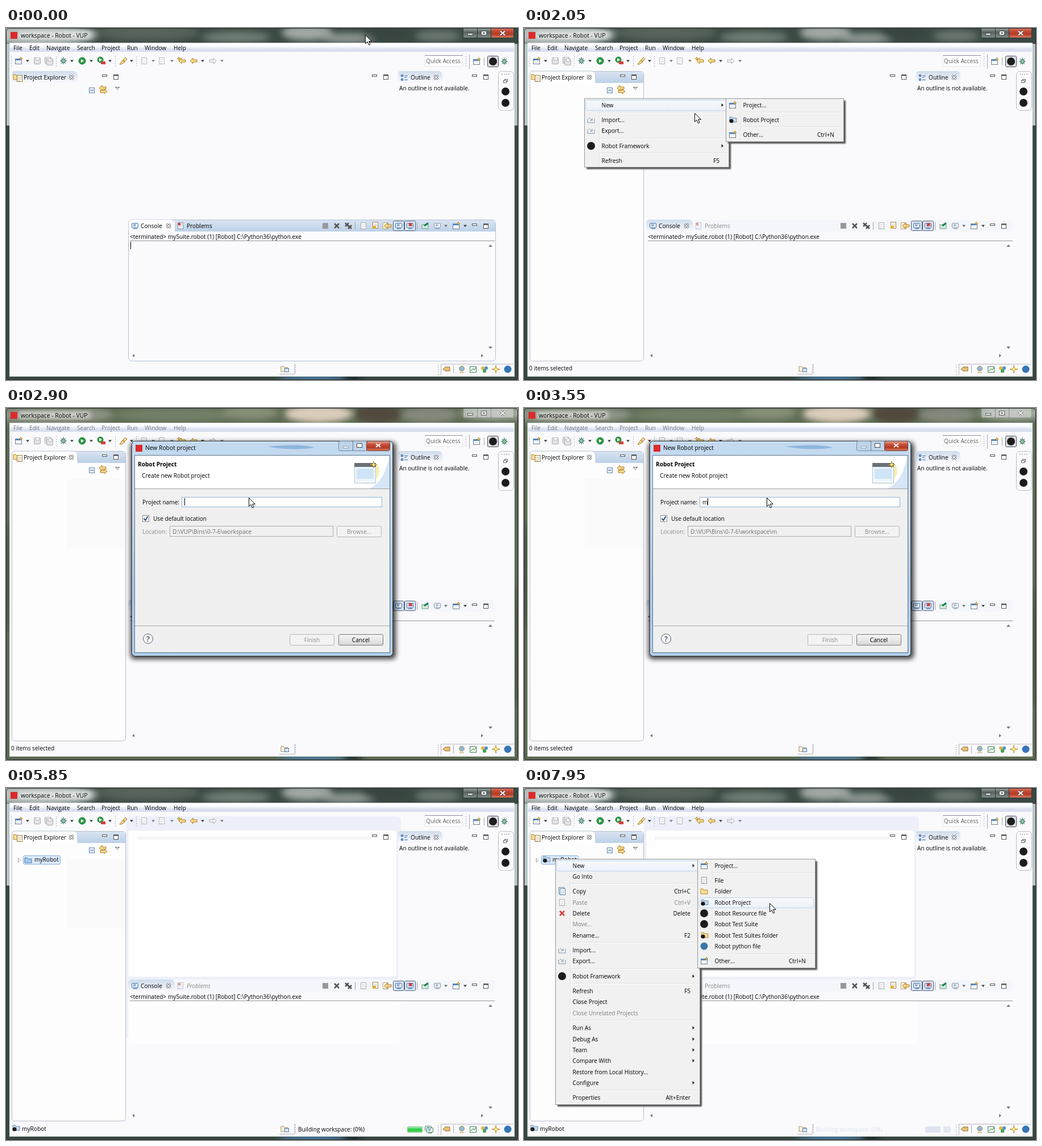
Write an HTML page that moves like this. It is 901 px wide and 621 px high and loops after 8 s.

```html
<!DOCTYPE html>
<html lang="en">
<head>
<meta charset="utf-8">
<title>Robot workspace</title>
<style>
html, body { margin: 0; width: 100%; height: 100%; overflow: hidden; }
svg { display: block; width: 100vw; height: 100vh; }
text { font: 10.15px "Open Sans", "Noto Sans", sans-serif; white-space: pre; }
.caption { font-size: 10.3px; }
.bold { font-weight: 700; }
.busy { font-style: italic; }
.help { font-size: 13px; font-weight: 600; }
</style>
</head>
<body>
<svg id="stage" viewBox="0 0 901 621" xmlns="http://www.w3.org/2000/svg"></svg>
<script>
const LOOP = 8000;
const stage = document.getElementById('stage');

// Drawing helpers: each returns SVG markup.
const rect = (x, y, w, h, fill, more = '') =>
  `<rect x="${x}" y="${y}" width="${w}" height="${h}" fill="${fill}" ${more}/>`;
const box = (x, y, w, h, fill, stroke, r = 0) =>
  rect(x + .5, y + .5, w - 1, h - 1, fill, `stroke="${stroke}" rx="${r}"`);
const path = (d, stroke, fill = 'none', more = '') =>
  `<path d="${d}" stroke="${stroke}" fill="${fill}" ${more}/>`;
const dot = (x, y, r, fill, stroke = 'none') =>
  `<circle cx="${x}" cy="${y}" r="${r}" fill="${fill}" stroke="${stroke}"/>`;
const blob = (x, y, rx, ry, fill) =>
  `<ellipse cx="${x}" cy="${y}" rx="${rx}" ry="${ry}" fill="${fill}"/>`;
const text = (x, y, s, fill = '#000', more = '') =>
  `<text x="${x}" y="${y}" fill="${fill}" ${more}>${s}</text>`;
const group = (more, ...parts) => `<g ${more}>${parts.join('')}</g>`;
const during = (from, to, ...parts) => group(`data-from="${from}" data-to="${to}"`, ...parts);
const ramp = (id, ...colors) => `<linearGradient id="${id}" x2="0" y2="1">` +
  colors.map((c, i) => `<stop offset="${i / (colors.length - 1)}" stop-color="${c}"/>`).join('') +
  '</linearGradient>';
const blur = (id, size) => `<filter id="${id}"><feGaussianBlur stdDeviation="${size}"/></filter>`;

// Small symbols, placed by their centre.
const down = (x, y, c = '#333') => path(`M${x - 3} ${y - 1.5}h6l-3 3.5z`, 'none', c);
const right = (x, y, c = '#222') => path(`M${x - 1.5} ${y - 3}l3.5 3l-3.5 3z`, 'none', c);
const grip = (x, y, n = 9) => path(`M${x + .5} ${y}v${n * 2}`, '#9a9aa4', 'none', 'stroke-dasharray="1.5 2.5"');
const bar = (x, y, h = 14) => rect(x, y, 1, h, '#a5a5ad');
const cross = (x, y) => {
  const d = `M${x - 3.5} ${y - 3.5}l7 7m0 -7l-7 7`;
  return path(d, '#666', 'none', 'stroke-width="3.4"') + path(d, '#fff', 'none', 'stroke-width="1.5"');
};
const minMax = (x, y) => box(x - 4, y - 2, 9, 4, '#fff', '#555') +
  box(x + 16, y - 2, 9, 9, '#fff', '#555') + rect(x + 16, y - 1, 9, 1.5, '#555');
const star = (x, y, r = 4) => path(
  `M${x} ${y - r}Q${x} ${y} ${x + r} ${y}Q${x} ${y} ${x} ${y + r}Q${x} ${y} ${x - r} ${y}Q${x} ${y} ${x} ${y - r}z`,
  '#b8922c', '#ffe88c');
const pane = (x, y) => box(x - 6, y - 4, 12, 10, '#eef6ff', '#7b7f84') +
  rect(x - 6, y - 4, 12, 3, '#4f86c4') + star(x + 4, y - 4, 3);
const sheet = (x, y, c = '#8795a8') => box(x - 5, y - 6, 10, 12, '#fff', c) +
  path(`M${x - 3} ${y - 2}h6m-6 3h6m-6 3h4`, c, 'none', 'opacity=".6"');
const folder = (x, y, fill = '#f8dc94', line = '#b88a35') =>
  path(`M${x - 6} ${y + 5}v-9h4l1.5 2h6.5v7z`, line, fill);
const disc = (x, y) => box(x - 6, y - 6, 12, 12, '#e3e3e6', '#a9a9af', 1) + box(x - 3, y - 6, 7, 5, '#fff', '#bbb');
const arrow = (x, y, fill = '#f9dc8c', line = '#a87a20') =>
  path(`M${x - 6} ${y}l5 -5v3h7v4h-7v3z`, line, fill);
const bug = (x, y) => path(`M${x - 6} ${y}h12m-10 -5l8 10m0 -10l-8 10m4 -12v13`, '#3d6f70') +
  dot(x, y, 3.5, '#8fc09b', '#2f6b62');
const run = (x, y, r = 6) => dot(x, y, r, '#2d9b45', '#1b7430') +
  path(`M${x - 2} ${y - 3}l5 3l-5 3z`, 'none', '#fff');
const logo = (x, y, r = 7) => dot(x, y, r, '#1c1c1c');
const project = (x, y) => folder(x + 1, y - 1, '#c9def3', '#5f87b4') + logo(x - 2, y + 2, 3.6);
const screen = (x, y, c = '#3c6da8') => box(x - 6, y - 5, 12, 9, '#e8f1fb', c, 1) +
  path(`M${x - 3} ${y - 2}h5m-5 2h4m-4 5h7`, c);
const strike = (x, y, c = '#555', r = 4) =>
  path(`M${x - r} ${y - r}l${2 * r} ${2 * r}m0 ${-2 * r}l${-2 * r} ${2 * r}`, c, 'none', 'stroke-width="2.5"');
const transfer = (x, y) => path(`M${x - 6} ${y - 2}v7h12v-7M${x - 4} ${y - 4}l6 5m0 -4v4h-4`, '#7796b5');
const appMark = (x, y) => rect(x, y, 12, 12, '#dc2a2a');

const defs = '<defs>' +
  ramp('menubar', '#fff', '#fbfcff', '#dbe3f1', '#d6deee') + ramp('header', '#d9e4f2', '#bcd0e7') +
  ramp('tab', '#cfdcec', '#f9f9fd') + ramp('button', '#f4f4f4', '#e8e8e8', '#d6d6d6') +
  ramp('closeRamp', '#e7aa9c', '#c9503b', '#b23a25', '#d98266') + ramp('glass', '#c3daf0', '#c3d6ea', '#9fc3e6', '#a9cbec') +
  ramp('hot', '#f7f9fc', '#ecf2fa') + ramp('control', '#b8bfbf', '#59635f', '#828c89') +
  ramp('trough', '#f7f7f7', '#c9c9c9', '#dedede') + ramp('done', '#b5f3b9', '#25c93e', '#5fdd70') +
  blur('haze', 6) + blur('soft', 4) + blur('edge', 1.2) + '</defs>';

// Window frame
const controls = (fill, close, ink, line, opacity) =>
  group(`opacity="${opacity}"`, box(804, -3, 26, 21, fill, line, 3), box(829, -3, 25, 21, fill, line), box(853, -3, 41, 21, close, line, 3)) +
  box(812, 9, 10, 4, '#fff', ink) + box(836, 5, 10, 8, '#fff', ink) + rect(839, 8, 4, 2, ink) +
  path('M870 5.5l8 7m0 -7l-8 7', ink, 'none', 'stroke-width="3.5"') + path('M870 5.5l8 7m0 -7l-8 7', '#fff', 'none', 'stroke-width="2"');

const lowerEdge = blob(540, 620, 60, 7, '#4b7ba6') + blob(610, 620, 18, 6, '#16232b');
const activeFrame = rect(0, 0, 901, 621, '#3a4a43') +
  group('filter="url(#haze)"', blob(60, 12, 100, 20, '#b7c0bd'), blob(250, 8, 90, 14, '#56645c'),
    blob(405, 16, 60, 10, '#707f75'), blob(530, 8, 45, 14, '#a1a8a4'), blob(600, 18, 50, 9, '#8e9793'),
    blob(665, 8, 40, 13, '#39443f'), blob(760, 14, 40, 10, '#697770'), lowerEdge) +
  rect(0, 28, 7, 144, '#bac5c5') + rect(894, 28, 7, 144, '#bac5c5') +
  controls('url(#control)', 'url(#closeRamp)', '#454b50', '#303836', 1);
const idleFrame = rect(0, 0, 901, 621, '#5d6a52') +
  group('filter="url(#haze)"', blob(80, 12, 110, 16, '#8d9486'), blob(300, 12, 110, 13, '#737f69'),
    blob(430, 8, 50, 13, '#858e78'), blob(550, 10, 60, 16, '#dccdbc'), blob(655, 10, 42, 18, '#51483d'),
    blob(745, 12, 50, 14, '#84897f'), blob(860, 9, 60, 12, '#a9b0a5'), blob(2, 300, 6, 100, '#465340'),
    blob(899, 420, 6, 110, '#465340'), lowerEdge) +
  controls('#e5e9e5', '#e5e9e5', '#555', '#747b75', .45);

const frameFront = rect(7, 27, 887, 587, '#fafafd') + rect(7, 27, 887, 15, 'url(#menubar)') +
  rect(6.5, 26.5, 888, 588, 'none', 'stroke="#e5ecec"') + rect(.5, .5, 900, 620, 'none', 'stroke="#202927" rx="5"') +
  group('filter="url(#soft)" opacity=".6"', rect(22, 6, 126, 13, '#fff')) +
  appMark(8, 7) + text(26, 17, 'workspace - Robot - VUP', '#000', 'class="caption"');

const menuNames = { File: 13, Edit: 41, Navigate: 71, Search: 125, Project: 168, Run: 213, Window: 244, Help: 295 };
const menuBar = ink => Object.entries(menuNames).map(([s, x]) => text(x, 39, s, ink)).join('');

const toolbar = [9, 88, 192, 229, 809].map(x => grip(x, 50)).join('') +
  [38, 116, 150, 183, 221, 346].map(x => down(x, 58)).join('') +
  [259, 292, 380].map(x => down(x, 58, '#777')).join('') +
  pane(22, 58) + disc(55, 58) + disc(74, 57) + disc(77, 60) + bug(101, 58) + run(134, 58) +
  run(166, 56, 5) + rect(167, 59, 8, 5, '#d2413a') +
  path('M200 64l5 -7l4 3l-6 4zM206 56l4 -4l3 3l-4 4z', '#a97b2e', '#f6d58a') +
  sheet(243, 58, '#b5b5ba') + sheet(274, 58, '#b5b5ba') + arrow(310, 58) + star(304, 54, 3) + arrow(330, 58) +
  path('M370 58l-5 -5v3h-7v4h7v3z', '#aaa', '#f4f4f6') +
  box(737, 48, 67, 20, '#fff', '#e6e6ec') + rect(737, 48, 67, 1, '#8d8d96') + text(739, 62, 'Quick Access', '#5c5c5c') +
  bar(815, 47, 25) + pane(828, 59) + bar(841, 52) + box(847, 49, 20, 20, '#dcdfe6', '#4b4b50', 2) + logo(857, 59) + bug(877, 59);

// Views
const explorerIdle = path('M10 96V81q0 -5 5 -5h104q6 0 7 8v12z', 'none', 'url(#tab)');
const explorerActive = box(10, 76, 201, 512, '#fdfdfe', '#b9bdca', 5) + rect(125, 77, 85, 20, 'url(#header)') +
  path('M10.5 97V81q0 -5 5 -5h103q7 0 7.5 8v13', '#b5c1d2', '#fff');
const explorer = folder(19, 86) + sheet(24, 89, '#9c7936') + text(31, 91, 'Project Explorer') + cross(115, 87) + minMax(173, 84) +
  box(146, 105, 10, 10, '#e9f1fb', '#6386af') + rect(148, 109.5, 6, 1, '#345b8c') +
  arrow(170, 106) + path('M178 112l-5 -4v2h-7v4h7v2z', '#a87a20', '#f9dc8c') +
  path('M192.5 104.5h7l-3.5 4z', '#666', '#fff');

const outline = path('M690 96V81q0 -5 5 -5h66q6 0 7 8v12z', 'none', 'url(#tab)') +
  box(695, 82, 4, 4, '#8bb4e0', '#3c6ca8') + box(695, 89, 4, 4, '#8bb4e0', '#3c6ca8') + path('M701 84.5h6m-6 3h4m-4 4h6', '#3c6ca8') +
  text(712, 91, 'Outline') + cross(757, 87) + minMax(824, 84) + text(692, 110, 'An outline is not available.') + minMax(648, 84) +
  box(866, 76, 28, 70, '#fbfbfd', '#b9bdc8', 6) + path('M872 81.5h15', '#888', 'none', 'stroke-dasharray="2 2"') +
  box(877, 90, 6, 5, '#fff', '#666') + box(875, 92, 6, 5, '#fff', '#666') + logo(879, 112) + logo(879, 132);

const consoleActive = box(215, 338, 647, 250, '#fbfbfe', '#b4c0d2', 6) + rect(297, 339, 564, 21, 'url(#header)') +
  path('M215.5 360V344q0 -6 6 -6h68q7 0 8 8v14z', '#b4c0d2', '#fff', 'stroke-opacity=".6"') + rect(216, 359, 645, 16, '#fbfbfe');
const consoleIdle = path('M215 359V344q0 -6 6 -6h69q6 0 7 8v13z', 'none', 'url(#tab)') + rect(297, 339, 563, 20, '#f5f6fb');
const problems = (ink, opacity, more = '') => group(`opacity="${opacity}"`, sheet(307, 349), dot(305, 346, 2.5, '#d34a43')) +
  text(318, 353, 'Problems', ink, more);
const consoleFront = screen(227, 349) + text(237, 353, 'Console') + cross(286, 349) +
  rect(557, 344, 10, 10, '#98989c') + strike(582, 349) + strike(600, 347, '#555', 3) + strike(605, 351, '#555', 3) +
  bar(614, 342) + sheet(629, 349, '#aaa') + sheet(650, 348, '#9d8450') + rect(645, 349, 6, 5, '#e1ad36') + sheet(668, 349, '#bba56d') + arrow(672, 349) +
  box(681, 340, 20, 18, '#dce6f3', '#4d5e75', 2) + screen(691, 349) + box(701, 340, 20, 18, '#dce6f3', '#4d5e75', 2) +
  screen(711, 349) + strike(712, 347, '#d43d38', 2.5) + bar(723, 342) + rect(732, 347, 11, 7, '#d5eadf', 'stroke="#6a9a85"') + path('M736 349l7 -5', '#168253', 'none', 'stroke-width="3"') +
  screen(759, 349, '#88929e') + down(774, 349, '#666') + pane(792, 349) + down(808, 349) + minMax(824, 347) +
  text(218, 372, '&lt;terminated&gt; mySuite.robot (1) [Robot] C:\\Python36\\python.exe') + rect(218, 375, 642, 1, '#969699') +
  path('M849 386l3.5 -4l3.5 4zM849 562l3.5 4l3.5 -4zM226 575l-4 3l4 3zM836 575l4 3l-4 3z', 'none', '#77777e');

const statusBar = path('M481 610.5h27V592', '#b4b4bd') + folder(490, 601, '#fdf6e2', '#a5895a') + box(490, 600, 8, 7, '#dbe8f6', '#56789f') + grip(509, 594, 8) +
  grip(760, 594, 9) + path('M765.5 612V593h128', '#b4b4bd') + path('M769 602l4 -4h8v7h-8z', '#966b27', '#e7c277') + bar(787, 595) +
  dot(802, 601, 4.5, '#8db9dc', '#b9933d') + path('M798 608h8', '#b9933d') + box(816, 597, 12, 11, '#eefae9', '#4b7e66') + path('M818 605l4 -4l2 2l3 -4', '#287847') +
  dot(839, 600, 3, '#e3b53a') + dot(845, 600, 3, '#4c91ce') + dot(842, 605, 3.2, '#49a354') + star(862, 602, 7) + dot(883, 602, 6.5, '#3676b7');

const wash = rect(211, 50, 484, 30, '#edeff9', 'rx="7"') + rect(211, 70, 479, 370, '#edeff9') +
  rect(215, 338, 480, 105, '#fafafd') + rect(215, 75, 472, 258, '#fefefe', 'rx="4"') +
  rect(230, 85, 414, 6, '#f6f6f8') + rect(215, 376, 479, 75, '#fdfdfe', 'rx="6"');

// Context menus
const menuIcons = {
  'Import...': transfer, 'Export...': transfer, 'Robot Framework': logo, 'Project...': pane, 'Other...': pane, File: sheet, Folder: folder,
  Copy: (x, y) => sheet(x - 1, y - 1, '#5687a9') + sheet(x + 1, y + 1, '#5687a9'), Paste: (x, y) => sheet(x, y, '#aaa'),
  Delete: (x, y) => strike(x, y, '#dc3e3e'), 'Robot Project': project, 'Robot Resource file': logo, 'Robot Test Suite': logo,
  'Robot Test Suites folder': (x, y) => folder(x + 1, y - 1) + logo(x - 2, y + 2, 3.6), 'Robot python file': (x, y) => dot(x, y, 6.5, '#3875a8')
};
const hotRow = (x, y, w) => box(x, y, w, 19, 'url(#hot)', '#bcd5ef', 2);

// Item marks: "-" separator, "~" disabled, ">" submenu, "|" shortcut.
function menu(x, top, w, items, hot, opacity = 1) {
  const ROW = 19.4, GAP = 6.9;
  let y = top + 11.5, out = '';
  for (const item of items) {
    if (item === '-') {
      out += rect(x + 27, Math.round(y - 7), w - 29, 1, '#dedfe0') + rect(x + 27, Math.round(y - 6), w - 29, 1, '#fff');
      y += GAP;
      continue;
    }
    const [label, key] = item.replace(/[~>]/g, '').split('|');
    const ink = item[0] === '~' ? '#808080' : '#000', cy = Math.round(y);
    if (label === hot) out += hotRow(x + 2, cy - 9, w - 5);
    if (menuIcons[label]) out += menuIcons[label](x + 12, cy);
    out += text(x + 30.5, cy + 4, label, ink);
    if (key) out += text(x + w - 17, cy + 4, key, ink, 'text-anchor="end"');
    if (item.endsWith('>')) out += right(x + w - 12, cy);
    y += ROW;
  }
  const h = Math.round(y - 6.9 - top);
  return rect(x + 4, top + 4, w - 1, h - 1, '#555', 'filter="url(#edge)"') +
    (opacity < 1 ? rect(x, top, w, h, '#fafafd') : '') +
    group(`opacity="${opacity}"`, box(x, top, w, h, '#f1f1f1', '#979797'),
      rect(x + 26, top + 2, 1, h - 4, '#e0e1e2'), rect(x + 27, top + 2, 1, h - 4, '#fff'), out);
}
const emptyMenu = ['New>', '-', 'Import...', 'Export...', '-', 'Robot Framework>', '-', 'Refresh|F5'];
const emptySub = ['Project...', '-', 'Robot Project', '-', 'Other...|Ctrl+N'];
const projectMenu = ['New>', 'Go Into', '-', 'Copy|Ctrl+C', '~Paste|Ctrl+V', 'Delete|Delete', '~Move...', 'Rename...|F2', '-',
  'Import...', 'Export...', '-', 'Robot Framework>', '-', 'Refresh|F5', 'Close Project', '~Close Unrelated Projects', '-',
  'Run As>', 'Debug As>', 'Team>', 'Compare With>', 'Restore from Local History...', 'Configure>', '-', 'Properties|Alt+Enter'];
const projectSub = ['Project...', '-', 'File', 'Folder', 'Robot Project', 'Robot Resource file', 'Robot Test Suite',
  'Robot Test Suites folder', 'Robot python file', '-', 'Other...|Ctrl+N'];
const menuA = (hot, opacity) => menu(106, 124, 255, emptyMenu, hot, opacity);
const subA = hot => menu(355, 124, 208, emptySub, hot);
const menuB = (hot, opacity) => menu(55, 125, 255, projectMenu, hot, opacity);
const subB = hot => menu(305, 125, 208, projectSub, hot);

// New project dialog
const GRAY = '#8b8b8b', DIM = '#6d6d6d';
const button = (x, y, label, on, line = '#777') =>
  box(x, y, 79, 20, on ? 'url(#button)' : '#f3f3f3', on ? line : '#b2b5b8', 2) +
  text(x + 39.5, y + 14, label, on ? '#000' : GRAY, 'text-anchor="middle"');
const under = c => `<tspan text-decoration="underline">${c}</tspan>`;
const dialogShadow = rect(219, 60, 467, 383, '#000', 'rx="7" opacity=".75" filter="url(#soft)"');
const dialogBase =
  box(221, 58, 460, 380, 'url(#glass)', '#1f2b36', 6) + rect(222.5, 59.5, 457, 377, 'none', 'stroke="#e4f1fd" rx="5"') +
  path('M460 68q60 -6 84 2q-40 6 -84 -2z', 'none', '#8eb6db') +
  box(585, 58, 26, 18, '#bed4e9', '#74889d', 3) + box(610, 58, 25, 18, '#bed4e9', '#74889d') + box(634, 58, 42, 18, 'url(#closeRamp)', '#713c35', 3) +
  box(593, 67, 10, 4, '#f5f8fb', '#92a2b2') + box(617, 62, 10, 8, '#fff', '#454b50') + path('M651 63l8 6m0 -6l-8 6', '#fff', 'none', 'stroke-width="2"') +
  appMark(228, 65) + text(245, 74, 'New Robot project', '#000', 'class="caption"') +
  box(226, 83, 450, 349, '#f0f0f0', '#60788f') + rect(227, 84, 448, 58, '#fff') + rect(227, 142, 448, 1, '#a0a0a0') +
  path('M640 142q26 -12 35 -58v58z', 'none', '#d7e6f6') + text(232, 103, 'Robot Project', '#000', 'class="bold"') + text(239, 123, 'Create new Robot project') +
  path('M652 102q8 20 -18 30', '#f6efb1', 'none', 'stroke-width="6"') + box(613, 97, 38, 36, '#eef6fe', '#b9c4ce') + rect(613, 97, 38, 7, '#6b7077') + rect(617, 107, 30, 18, '#cfe4f6') + star(647, 100, 6) +
  box(309, 157, 353, 18, '#fff', '#8db6dc') + box(240, 189, 12, 12, '#f7f9fb', '#8e8f8f') +
  path('M242.5 195l3 3l4 -7', '#3a4c88', 'none', 'stroke-width="2"') +
  box(288, 208, 288, 19, '#f0f0f0', '#a9acb0') + button(582, 208, 'Browse...', false) +
  rect(227, 384, 448, 1, '#a0a0a0') + rect(227, 385, 448, 1, '#fff') + dot(250, 407, 8.5, '#f6f6f8', '#59616e') + text(250, 411.5, '?', '#36465f', 'class="help" text-anchor="middle"');
const idleLabels = text(240, 170, 'Project name:') + text(259, 199, 'Use default location') + text(240, 222, 'Location:', GRAY);
const cancelOn = button(585, 399, 'Cancel', true);
const dialogPlain = dialogBase + idleLabels + button(499, 399, 'Finish', false) + cancelOn;
const dialogFaint = (opacity, sx, sy) =>
  group(`opacity="${opacity}" transform="translate(451 240) scale(${sx} ${sy}) translate(-451 -248)"`, dialogPlain);
const dialogLive = dialogShadow + dialogBase +
  during(2900, 4550, idleLabels, cancelOn) + during(2900, 3650, button(499, 399, 'Finish', false)) +
  during(3650, 4550, button(499, 399, 'Finish', true, '#3d9bc9')) +
  during(4550, 5200, rect(310, 158, 351, 16, '#f0f0f0'), text(240, 170, under('P') + 'roject name:', GRAY),
    text(259, 199, `Use ${under('d')}efault location`), text(240, 222, under('L') + 'ocation:', GRAY),
    button(499, 399, under('F') + 'inish', true, '#3d9bc9'), button(585, 399, 'Cancel', false),
    box(231, 365, 418, 14, 'url(#trough)', '#a7a7a7', 2), box(656, 367, 10, 10, '#e32d3c', '#9f2430', 1)) +
  text(314, 170, '', '#000', 'id="name"') + text(293, 222, '', DIM, 'id="location"') +
  group('id="caret"', rect(0, 159, 1, 13, '#000'));

const treeRow = during(4700, LOOP, during(5600, LOOP, box(30, 119, 66, 16, '#dcebfc', '#84acdd', 2)),
  path('M21.5 124l4 3.5l-4 3.5z', '#a0a0a0', '#fff'), during(4700, 6250, folder(39, 127, '#a9cbef', '#4778ae')),
  during(6250, LOOP, project(39, 126)), text(50, 130, 'myRobot'));

stage.innerHTML = defs +
  during(0, 2650, activeFrame) + during(2650, 5200, idleFrame) + during(5200, LOOP, activeFrame) + frameFront +
  during(0, 2650, menuBar('#000')) + during(2650, 5200, menuBar('#747980')) + during(5200, LOOP, menuBar('#000')) +
  during(5200, LOOP, wash) + toolbar +
  during(0, 1200, explorerIdle, consoleActive, problems('#000', 1), rect(219, 377, 1, 13, '#000')) +
  during(1200, LOOP, explorerActive, consoleIdle) + during(2650, LOOP, rect(107, 125, 103, 123, '#fafafb')) +
  during(1200, 5750, problems('#8a8a8a', .5)) + during(5750, 6250, problems('#8a8a8a', .5, 'class="busy"')) +
  during(6250, LOOP, problems('#8a8a8a', .5)) + explorer + outline + consoleFront + statusBar +
  during(1200, 5600, text(9, 604, '0 items selected')) + during(5600, LOOP, project(17, 600), text(28, 605, 'myRobot')) +
  during(5750, 6250, text(514, 606, 'Building workspace: (0%)'), box(706, 597, 27, 11, 'url(#done)', '#9bc6a0', 1), screen(743, 601, '#47835e'), screen(746, 604, '#47835e')) +
  during(6250, LOOP, text(514, 606, 'Building workspace: (0%)', '#dde1ef'), rect(706, 597, 27, 11, '#dfe3f2'), rect(738, 597, 13, 11, '#e3e6f3', 'rx="3"')) +
  treeRow +
  during(1350, 1450, menuA('', .22)) + during(1450, 2650, menuA('New')) +
  during(1850, 2200, subA('')) + during(2200, 2330, subA('Other...')) + during(2330, 2650, subA('Robot Project')) +
  during(2650, 2800, dialogFaint(.2, .935, .926), box(357, 153, 204, 19, '#fafbfd', '#cbdcee', 2), project(367, 162), text(385.5, 166, 'Robot Project')) +
  during(2800, 2900, dialogFaint(.65, .98, .98)) +
  during(2900, 5050, dialogLive) + during(5050, 5200, dialogFaint(.3, .96, .95)) +
  during(6600, 6700, menuB('', .3)) + during(6700, 6850, menuB('')) + during(6850, LOOP, menuB('New')) +
  during(7050, 7250, subB('')) + during(7250, 7370, subB('File')) + during(7370, 7650, subB('Robot Project')) +
  during(7650, 7800, subB('Robot Resource file')) + during(7800, LOOP, subB('Robot Project')) +
  group('id="pointer"', path('M.5 .5v15l3.5 -3.2l2.5 5.7l2.4 -1.1l-2.4 -5.4h4.8z', '#000', '#fff'));

// Pointer stops: time, x, y.
const route = [
  [0, 632, 12], [450, 632, 12], [570, 590, 24], [1050, 107, 125], [1170, 107, 125], [1290, 121, 126], [1410, 121, 126],
  [1530, 142, 130], [1650, 148, 131], [1900, 148, 131], [2010, 300, 150], [2200, 400, 198], [2370, 427, 158], [5200, 427, 158],
  [5210, 55, 125], [6690, 55, 126], [6930, 110, 138], [7050, 150, 138], [7290, 340, 150], [7400, 430, 198], [7530, 436, 204],
  [7650, 434, 212], [7850, 432, 203], [LOOP, 432, 203]
];
function pointerAt(t) {
  const held = t < 450 ? 0 : 450 + Math.floor((t - 450) / 120) * 120;
  const i = route.findIndex(stop => stop[0] > held), [t0, x0, y0] = route[i - 1], [t1, x1, y1] = route[i];
  const p = (held - t0) / (t1 - t0);
  return [Math.round(x0 + (x1 - x0) * p), Math.round(y0 + (y1 - y0) * p)];
}

const layers = [...stage.querySelectorAll('[data-from]')];
const get = id => document.getElementById(id);
const nameText = get('name'), locationText = get('location'), caret = get('caret'), pointer = get('pointer');
const keyTimes = [3550, 3650, 3800, 3900, 4000, 4150, 4250];
const show = (node, on) => { node.style.display = on ? '' : 'none'; };
const start = performance.now();

function draw() {
  const t = (performance.now() - start) % LOOP;
  for (const g of layers) show(g, t >= +g.dataset.from && t < +g.dataset.to);
  const typed = 'myRobot'.slice(0, keyTimes.filter(k => k <= t).length);
  nameText.textContent = typed;
  nameText.setAttribute('fill', t < 4550 ? '#000' : DIM);
  locationText.textContent = 'D:\\VUP\\Bins\\0-7-6\\workspace' + (typed && '\\' + typed);
  const width = typed ? nameText.getComputedTextLength() : 0;
  caret.setAttribute('transform', `translate(${Math.round(314 + width)} 0)`);
  show(caret, t < 4550);
  pointer.setAttribute('transform', `translate(${pointerAt(t).join(' ')})`);
  show(pointer, t < 5200 || t >= 6100);
  requestAnimationFrame(draw);
}
draw();
</script>
</body>
</html>
```
